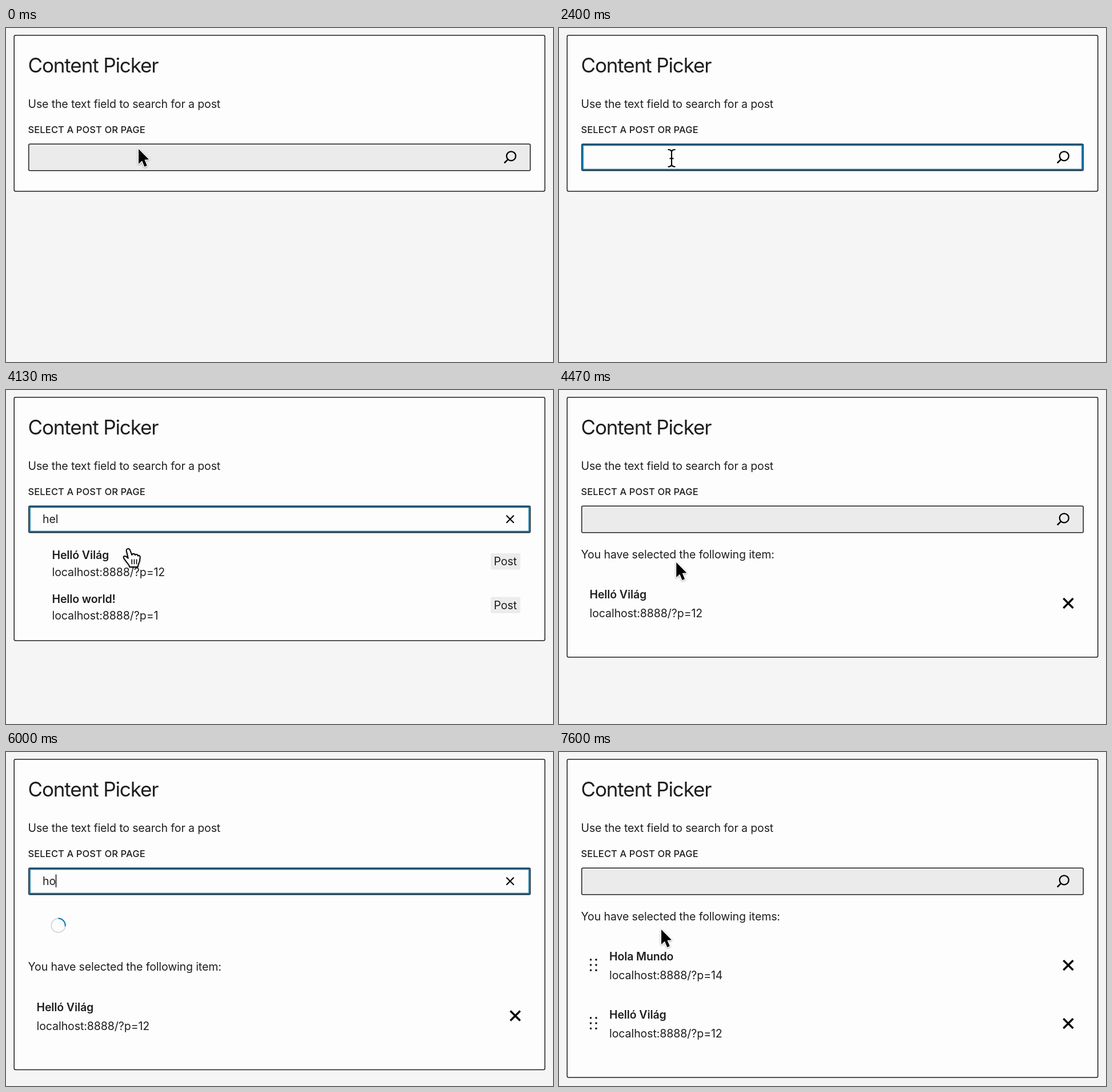
An HTML page for the animation above (8000 ms loop, 957 by 585 pixels).

```html
<!DOCTYPE html>
<html lang="en">
<head>
<meta charset="utf-8">
<title>Content Picker</title>
<style>
  html, body { margin: 0; width: 100%; height: 100%; overflow: hidden; background: #f5f5f5; }
  svg { display: block; width: 957px; height: 585px; }
  text { font: 400 19.5px Inter, Roboto, sans-serif; font-optical-sizing: none; letter-spacing: -.006em; fill: #1e1e1e; white-space: pre; }
  .title { font-size: 35px; letter-spacing: -.032em; }
  .label { font-size: 16.5px; font-weight: 500; letter-spacing: .0075em; }
  .name { font-weight: 600; }
  .url { letter-spacing: -.003em; }
  .line { fill: none; stroke: #000; }
  .box { stroke: #1e1e1e; stroke-width: 1.5; }
</style>
</head>
<body>
<svg id="stage" viewBox="0 0 957 585"></svg>
<script>
const LOOP = 8000, ROW = 76.5, ITEM = 102;
const PAPER = '#fdfdfd', BLUE = '#0073b0';
const stage = document.getElementById('stage');

const hello = { name: 'Helló Világ', id: 12 };
const world = { name: 'Hello world!', id: 1 };
const hola = { name: 'Hola Mundo', id: 14 };
const all = [hola, hello, world];

// Each state holds from its start time until the next one.
const states = [
  { at: 0 },
  { at: 1870, focus: true },
  { at: 2900, focus: true, query: 'h', loading: true },
  { at: 3070, focus: true, query: 'he', loading: true, spin: 2900 },
  { at: 3130, focus: true, query: 'he', results: all },
  { at: 3240, focus: true, query: 'hel', loading: true },
  { at: 3570, focus: true, query: 'hel', results: [hello, world] },
  { at: 4450, picked: [hello] },
  { at: 5100, focus: true, picked: [hello] },
  { at: 5800, focus: true, query: 'h', results: all, picked: [hello] },
  { at: 5990, focus: true, query: 'ho', loading: true, picked: [hello] },
  { at: 6300, focus: true, query: 'ho', results: [hola], picked: [hello] },
  { at: 7400, picked: [hola, hello] }
];

const caretOn = [[1870, 2400], [2900, 3770], [4270, 4450], [5100, 5630], [5800, 6500], [7000, 7400]];
const caretX = { '': 65, h: 76, he: 87, hel: 91.7, ho: 87.5 };
const pointerOff = [[2900, 4000], [5800, 6830]];

// time, x, y of the pointer's hot spot
const path = [
  [0, 232, 212], [430, 232, 212], [570, 196, 226], [1800, 196, 226], [2030, 197, 228],
  [4000, 197, 228], [4130, 215, 279], [4400, 206, 300], [4570, 204, 305], [4770, 204, 305],
  [5000, 187, 237.8], [6830, 187, 237.8], [6970, 188, 268], [7250, 183, 300], [7600, 179, 311], [LOOP, 179, 311]
];

const within = (t, spans) => spans.some(([a, b]) => t >= a && t < b);

const text = (x, y, s, cls = '') => `<text x="${x}" y="${y}" class="${cls}">${s}</text>`;
const url = (x, y, item) => text(x, y, `localhost:8888/?p=${item.id}`, 'url');
const line = (d, width, extra = '') => `<path class="line" d="${d}" stroke-width="${width}" ${extra}/>`;
const cross = (x, y, r, width) =>
  line(`M${x - r} ${y - r}L${x + r} ${y + r}M${x + r} ${y - r}L${x - r} ${y + r}`, width);

function card(bottom) {
  return `<rect class="box" x="14.25" y="12.75" width="928.5" height="${bottom - 13.5}" rx="2.5" fill="${PAPER}"/>`
    + text(38.5, 78, 'Content Picker', 'title')
    + text(38.5, 139.5, 'Use the text field to search for a post')
    + text(38.5, 184, 'SELECT A POST OR PAGE', 'label');
}

function field({ focus, query = '' }, t) {
  let out = `<rect class="box" x="39.75" y="203.25" width="877.5" height="46.5" rx="2" fill="${focus ? PAPER : '#ebebeb'}"/>`;
  if (focus) out += `<rect x="41.6" y="205.1" width="873.8" height="42.8" fill="none" stroke="${BLUE}" stroke-width="2.4"/>`;
  out += query
    ? text(64, 233, query) + cross(882, 226.2, 6.5, 2.2)
    : '<circle class="line" cx="883.8" cy="224.3" r="8" stroke-width="2.3"/>' + line('M878 230.3L871.8 236.5', 2.5);
  if (within(t, caretOn)) out += line(`M${caretX[query]} 214.5V237`, 1.4);
  return out;
}

function resultRow(item, i) {
  const y = i * ROW;
  return text(80.5, 296 + y, item.name, 'name')
    + url(80.5, 325.5 + y, item)
    + `<rect x="848" y="${286 + y}" width="52" height="28.5" rx="3" fill="#ececec"/>`
    + text(853.5, 307.3 + y, 'Post');
}

function spinner(age) {
  return `<g transform="translate(91.5 303.8) rotate(${age / 1400 * 360})" fill="none" stroke-width="2">`
    + '<circle r="12.2" stroke="#d9d9d9"/>'
    + `<path d="M0 -12.2A12.2 12.2 0 0 1 12.2 0" stroke="${BLUE}" stroke-linecap="round"/></g>`;
}

function grip(y) {
  let d = '';
  for (const x of [54, 63.5]) for (const row of [-9.2, 0, 9.2]) d += `M${x} ${y + row - 1.5}h3v3h-3z`;
  return `<path d="${d}"/>`;
}

function pickedList(items, shift) {
  const many = items.length > 1, x = many ? 88 : 53.5;
  return text(38.5, 294.8 + shift, `You have selected the following item${many ? 's' : ''}:`)
    + items.map((item, i) => {
      const y = shift + i * ITEM;
      return text(x, 365 + y, item.name, 'name') + url(x, 398.3 + y, item)
        + cross(891, 373.5 + y, 8.5, 3.4) + (many ? grip(373 + y) : '');
    }).join('');
}

const pointers = {
  arrow: '<path d="M0 0V26L6 20.5L10.3 31L14.8 29L10.4 18.8L18 18.3Z" stroke="#fff" stroke-width="2.6" paint-order="stroke" stroke-linejoin="round"/>',
  beam: ['#fff', '#000'].map((c, i) =>
    `<path d="M-6.5 -15C-2 -15 0 -13.5 0 -10.5V10.5C0 13.5 -2 15 -6.5 15M6.5 -15C2 -15 0 -13.5 0 -10.5M0 10.5C0 13.5 2 15 6.5 15M-3.5 .5H3.5" fill="none" stroke="${c}" stroke-width="${i ? 2.1 : 4.2}"/>`).join(''),
  hand: '<path d="M-4.2 3C-5 -1.5 .5 -2.5 2.2 2L5.2 10C6 7 10 7 11 10.2C12 8 15.6 8.6 16 11.8C17 10 19.8 11 19.6 14L18.8 20C18.2 24 15.8 26 15.5 31H1.5C1 28 -2 25 -5 21C-7.5 17.5 -10 15.5 -9.2 13C-7.5 10.5 -4 13 -1.2 15.8Z" fill="#fff" stroke="#000" stroke-width="1.9" stroke-linejoin="round"/>'
    + line('M5.2 18V25.5M9.4 18V25.5M13.5 18V25.5', 1.6, 'stroke-linecap="round"')
};

function pointer(t, state) {
  if (within(t, pointerOff)) return '';
  const k = path.findIndex(p => p[0] > t);
  const [t0, x0, y0] = path[k - 1], [t1, x1, y1] = path[k];
  const u = (t - t0) / (t1 - t0), e = u * u * (3 - 2 * u);
  const x = x0 + (x1 - x0) * e, y = y0 + (y1 - y0) * e;
  const kind = t >= 1800 && y < 250 ? 'beam' : state.results && y > 272 ? 'hand' : 'arrow';
  const shadow = kind === 'beam' ? '' : 'style="filter:drop-shadow(0 1.5px 1.5px rgba(0,0,0,.35))"';
  return `<g transform="translate(${x} ${y})" ${shadow}>${pointers[kind]}</g>`;
}

function draw(t) {
  const state = states.filter(s => s.at <= t).pop();
  const { results = [], picked = [], loading } = state;
  const rows = loading ? 1 : results.length;
  const shift = rows * ROW + (rows && picked.length ? 12 : 0);
  const bottom = 286.7 + shift + (picked.length ? 80 + picked.length * ITEM : 0);
  stage.innerHTML = card(bottom) + field(state, t)
    + results.map(resultRow).join('')
    + (loading ? spinner(t - (state.spin ?? state.at)) : '')
    + (picked.length ? pickedList(picked, shift) : '')
    + pointer(t, state);
}

const start = performance.now();
function tick() {
  draw((performance.now() - start) % LOOP);
  requestAnimationFrame(tick);
}
tick();
</script>
</body>
</html>
```
